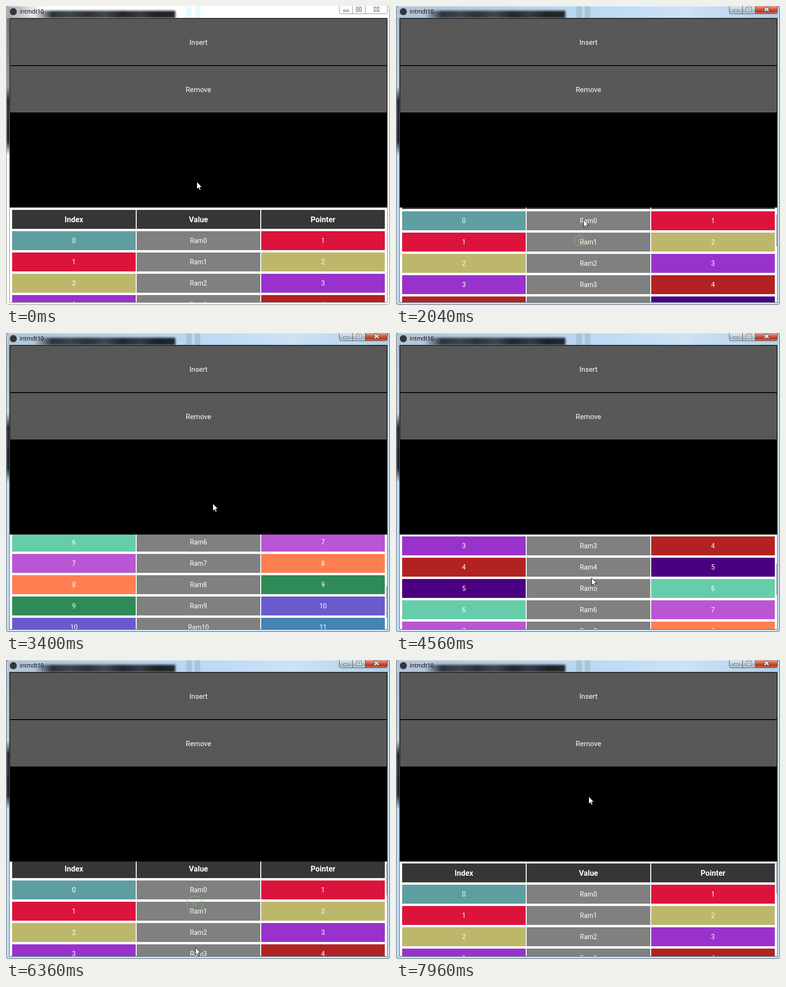
These frames come from a looping animation (814x632 px, 8000 ms). An HTML page with a canvas:

```html
<!DOCTYPE html>
<html lang="en">
<head>
<meta charset="utf-8">
<title>intmdt10</title>
<style>
html, body { margin: 0; width: 100%; height: 100%; overflow: hidden; background: #fff; }
canvas { display: block; }
</style>
</head>
<body>
<canvas id="stage" width="814" height="632"></canvas>
<script>
const ctx = document.getElementById('stage').getContext('2d');
const W = 814, H = 632, LOOP = 8000, FOCUS_AT = 1040;
const VIEW = { x: 8, y: 426, w: 800, h: 200 };
const CELL_W = 262, CELL_H = 40, COLUMN_STEP = 264, PITCH = 45;
const TRAVEL = 520, GLIDE_MS = 400, SLACK = 3;
const ROW_COLORS = ['cadetblue', 'crimson', 'darkkhaki', 'darkorchid', 'firebrick', 'indigo',
  'mediumaquamarine', 'mediumorchid', 'coral', 'seagreen', 'slateblue', 'steelblue', 'teal'];

const rest = (at, x, y) => ({ at, ms: 0, x, y, dx: 0, dy: 0, glide: 0 });
const drag = (at, ms, x, y, dx, dy, glide) => ({ at, ms, x, y, dx, dy, glide });
const GESTURES = [
  rest(0, 404, 371),
  rest(440, 394, 452),
  drag(1860, 440, 389, 496, 20, -110, 31),
  drag(2820, 500, 412, 522, 26, -162, 46),
  drag(4130, 310, 425, 430, -11, 90, 99),
  drag(5010, 290, 410, 450, -2, 50, 12),
  drag(6080, 308, 400, 516, 1, 100, 0),
  rest(7200, 405, 440),
  rest(7960, 408, 288)
];

const clamp01 = v => Math.min(1, Math.max(0, v));
const smooth = p => p * p * (3 - 2 * p);
const progress = (g, t) => g.ms ? clamp01((t - g.at) / g.ms) : 1;

// The list follows each drag after a little slack, then glides to a stop.
function scrollAt(t) {
  let scroll = 0;
  for (const g of GESTURES) {
    if (!g.ms || t < g.at) continue;
    const moved = Math.max(0, Math.abs(g.dy) * progress(g, t) - SLACK);
    const coast = 1 - (1 - clamp01((t - g.at - g.ms) / GLIDE_MS)) ** 4;
    scroll -= Math.sign(g.dy) * (moved + g.glide * coast);
  }
  return Math.round(scroll);
}

// The pointer rests after a gesture and travels just in time for the next.
function cursorAt(t) {
  const i = GESTURES.findLastIndex(g => g.at <= t);
  const g = GESTURES[i], next = GESTURES[i + 1], p = progress(g, t);
  const x = g.x + g.dx * p, y = g.y + g.dy * p;
  if (!next) return [x, y];
  const span = Math.min(TRAVEL, next.at - g.at - g.ms);
  const k = smooth(clamp01((t - next.at + span) / span));
  return [x + (next.x - x) * k, y + (next.y - y) * k];
}

function rect(x, y, w, h, fill) {
  ctx.fillStyle = fill;
  ctx.fillRect(x, y, w, h);
}

function frame(x, y, w, h, color, radius = 0) {
  ctx.strokeStyle = color;
  ctx.lineWidth = 1;
  ctx.beginPath();
  ctx.roundRect(x + 0.5, y + 0.5, w - 1, h - 1, radius);
  ctx.stroke();
}

function label(text, x, y, font, color = '#fff', align = 'center') {
  ctx.font = font;
  ctx.fillStyle = color;
  ctx.textAlign = align;
  ctx.fillText(text, x, y);
}

// Spreads the colours evenly from one point to the other.
function gradient(x0, y0, x1, y1, ...colors) {
  const g = ctx.createLinearGradient(x0, y0, x1, y1);
  colors.forEach((color, i) => g.addColorStop(i / (colors.length - 1), color));
  return g;
}

function drawGlass(focused) {
  const base = focused ? '#bdd9f0' : '#fff';
  rect(0, 0, W, H, base);
  if (focused) {
    rect(0, 0, W, 26, gradient(0, 0, W, 0, '#b3c4d4', '#b6cee2', '#bad9f4', '#cce2f5', '#b0cfe8'));
  } else {
    rect(0, 0, 80, 26, gradient(0, 0, 80, 0, '#a0a5aa', '#fff'));
  }
  for (const x of [382, 400]) rect(x, 0, 12, 26, focused ? '#aac4d6' : '#e6fbff');

  const pale = focused ? '#bccbd6' : '#8e969e';
  rect(0, 26, 8, 150, gradient(0, 26, 0, 176, focused ? '#a9bac8' : '#666e78', pale));
  rect(0, 170, 8, 146, gradient(0, 170, 0, 316, pale, '#20262e', '#2a3038', '#1c2028', '#222830', base));

  ctx.save();
  ctx.beginPath();
  ctx.rect(0, 0, W, 26);
  ctx.clip();
  ctx.filter = 'blur(2px)';
  rect(60, 10, 299, 16, gradient(60, 0, 359, 0, 'rgba(40,46,56,0)', '#2b323b', '#3d444c',
    '#2a3036', '#40464e', '#20252b', '#343a42', '#1c2024', '#22282e'));
  ctx.restore();

  frame(0, -1, W, H + 1, focused ? '#3a464f' : '#7a7a7a', 7);
  frame(1, 0, W - 2, H - 1, 'rgba(255,255,255,.65)', 6);
}

function drawCross(color, width, inset) {
  ctx.strokeStyle = color;
  ctx.lineWidth = width;
  ctx.beginPath();
  for (const s of [-1, 1]) {
    ctx.moveTo(785.5 - s * (5 - inset), 2.5 + inset);
    ctx.lineTo(785.5 + s * (5 - inset), 11.5 - inset);
  }
  ctx.stroke();
}

function drawCaptionButtons(focused) {
  ctx.save();
  ctx.beginPath();
  ctx.roundRect(706.5, -4, 102, 20.5, 4);
  ctx.clip();
  if (focused) {
    rect(706, 0, 56, 17, gradient(0, 0, 0, 17, '#dde8f0', '#c6d5e0', '#a2b5c4', '#bfd5e4'));
    rect(762, 0, 47, 17, gradient(0, 0, 0, 17, '#e3a598', '#cd6a55', '#bb3520', '#d87a5c'));
  } else {
    rect(706, 0, 103, 17, '#fff');
  }
  ctx.restore();
  const line = focused ? '#4c565e' : '#8c8c8c', ink = '#55585e';
  frame(706, -4, 103, 21, line, 4);
  rect(734, 0, 1, 16, line);
  rect(761, 0, 1, 16, line);

  rect(715, 8, 12, 4, '#fff');
  frame(715, 8, 12, 4, ink);
  rect(742, 2, 12, 10, '#fff');
  frame(742, 2, 12, 10, ink);
  frame(745, 5, 6, 4, ink);
  drawCross(ink, 4.2, 0);
  drawCross('#fff', 2.2, 0.8);
}

function drawTitle() {
  ctx.fillStyle = '#33363a';
  ctx.beginPath();
  ctx.arc(15.5, 12, 7.5, 0, Math.PI * 2);
  ctx.fill();
  label('intmdt10', 29, 16, '12px "Open Sans", sans-serif', '#000', 'left');
}

function drawButton(y, text) {
  rect(9, y, 798, 98, '#585858');
  frame(9, y, 798, 98, '#626262');
  label(text, 408, y + 55, '15px Roboto, sans-serif');
}

function drawRow(y, texts, colors, font, baseline) {
  texts.forEach((text, i) => {
    const x = 13 + i * COLUMN_STEP;
    rect(x, y, CELL_W, CELL_H, colors[i]);
    label(text, x + CELL_W / 2, y + baseline, font);
  });
}

function drawTable(scroll) {
  ctx.save();
  ctx.beginPath();
  ctx.rect(VIEW.x, VIEW.y, VIEW.w, VIEW.h);
  ctx.clip();
  rect(VIEW.x, VIEW.y, VIEW.w, VIEW.h, '#fff');
  const top = 431 - scroll;
  drawRow(top, ['Index', 'Value', 'Pointer'], Array(3).fill('#363636'),
    'bold 16px Roboto, sans-serif', 26);
  for (let n = 0; n < ROW_COLORS.length - 1; n++) {
    drawRow(top + PITCH * (n + 1), [n, 'Ram' + n, n + 1],
      [ROW_COLORS[n], 'gray', ROW_COLORS[n + 1]], '14px Roboto, sans-serif', 25);
  }
  if (scroll > 0) rect(806, 427 + scroll / 3, 2, 67, '#b3b3b3');
  ctx.restore();
}

function drawTouches(t) {
  ctx.strokeStyle = 'rgba(130,185,110,.6)';
  ctx.lineWidth = 2;
  for (const { at, ms, x, y } of GESTURES) {
    const age = t - at;
    if (!ms || age < 0 || age > 300) continue;
    for (const radius of [3.5, Math.max(3.5, age * 0.06)]) {
      ctx.beginPath();
      ctx.arc(x, y, radius, 0, Math.PI * 2);
      ctx.stroke();
    }
  }
}

function drawCursor(x, y) {
  ctx.save();
  ctx.translate(Math.round(x), Math.round(y));
  const arrow = new Path2D('M.5 .5V16.5L4 13L6.5 18.5L9 17.5L6.8 12H11.5Z');
  ctx.fillStyle = '#fff';
  ctx.fill(arrow);
  ctx.strokeStyle = '#000';
  ctx.lineWidth = 1;
  ctx.stroke(arrow);
  ctx.restore();
}

function draw(t) {
  const focused = t >= FOCUS_AT;
  drawGlass(focused);
  drawTitle();
  drawCaptionButtons(focused);
  frame(7, 25, 802, 602, focused ? '#566068' : '#808080');
  rect(8, 26, 800, 400, '#000');
  drawButton(27, 'Insert');
  drawButton(127, 'Remove');
  drawTable(scrollAt(t));
  drawTouches(t);
  drawCursor(...cursorAt(t));
}

const start = performance.now();
function tick() {
  const t = (performance.now() - start) % LOOP;
  draw(Math.floor(t / 40) * 40);
  requestAnimationFrame(tick);
}
tick();
</script>
</body>
</html>
```
